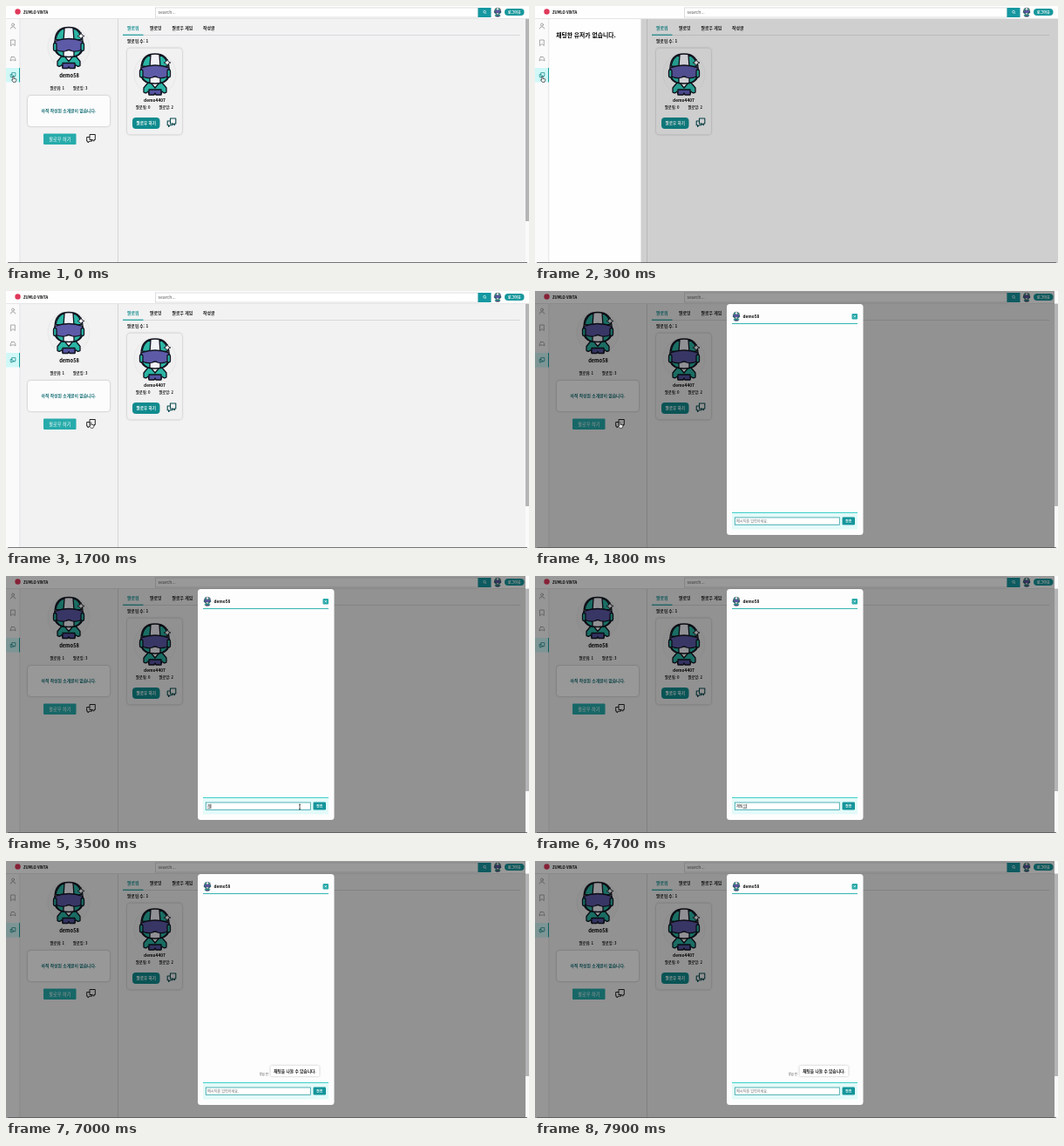
Write an HTML page that moves like this. It is 600 px wide and 295 px high and loops after 8 s.

```html
<!DOCTYPE html>
<html lang="ko">
<head>
<meta charset="utf-8">
<style>
  html, body { margin: 0; width: 100%; height: 100%; overflow: hidden; background: #f2f2f3; }
  svg { display: block; width: 100vw; height: 100vh; }
  text { font-family: "Noto Sans CJK KR", "Noto Sans CJK", "Noto Sans", sans-serif; fill: #151515; white-space: pre; }
  .b { font-weight: 700; }
  .k { font-weight: 900; fill: #000; }
  .m { text-anchor: middle; }
  .w { fill: #fff; }
  .line { fill: none; stroke: #888; stroke-width: .7; stroke-linejoin: round; stroke-linecap: round; }
  .soft { filter: drop-shadow(0 .6px 1px rgba(0,0,0,.28)); }
</style>
</head>
<body>
<svg viewBox="0 0 600 295" preserveAspectRatio="none">
  <defs>
    <g id="figure" stroke="#10131f" stroke-width="1.3" stroke-linejoin="round">
      <path d="M-8 10L-13 16V21Q-10 23-8 20L-7 23H7L8 20Q10 23 13 21V16L8 10Z" fill="#2bb5a5"/>
      <path d="M-5 10L0 16L5 10Z" fill="#fff"/>
      <path d="M-7 18H7V24H1L0 22L-1 24H-7Z" fill="#5553a0"/>
      <path d="M-16-6Q-16-23 0-23Q16-23 16-6V2Q14 11 0 11Q-14 11-16 2Z" fill="#f1f1f7"/>
      <path d="M-15-9Q-13-20-5-22L-6-8ZM5-22Q13-20 15-9L6-8ZM-15 2Q-13 9-6 10.500L-6 2ZM15 2Q13 9 6 10.500L6 2Z" fill="#2bb5a5"/>
      <path d="M-16-7Q0-13 16-7V2Q9 6 3 4Q0 2-3 4Q-9 6-16 2Z" fill="#5d5aa8"/>
      <rect x="-17.500" y="-5" width="3.500" height="9" rx="1.700" fill="#2bb5a5"/>
      <rect x="14" y="-5" width="3.500" height="9" rx="1.700" fill="#2bb5a5"/>
      <path d="M14-17L15.200-14.200L18-13L15.200-11.800L14-9L12.800-11.800L10-13L12.800-14.200Z" fill="#fff" stroke-width=".8"/>
    </g>
    <g id="avatar">
      <circle r="24" fill="#f0f0f1" stroke="#e2e2e3" stroke-width=".7"/>
      <use href="#figure"/>
    </g>
    <path id="chat" d="M-1.500-4.500H4.800V1.500H3.500V3.200L1.500 1.500H-1.500ZM-1.500-1.500H-4.800V3.200H-3.500V5L-1.500 3.200H1V1.500" fill="none" stroke-linejoin="round"/>
  </defs>

  <rect width="600" height="295" fill="#f2f2f3"/>

  <!-- profile panel -->
  <path d="M128.500 15V295" stroke="#d6d6d8"/>
  <use href="#avatar" x="72" y="47.500"/>
  <text class="k m" x="72.500" y="82" font-size="5.700">demo58</text>
  <text class="b" x="50.500" y="95.500" font-size="4.200">팔로워: 1</text>
  <text class="b" x="77" y="95.500" font-size="4.200">팔로잉: 3</text>
  <rect class="soft" x="25" y="103" width="94" height="35" rx="3.500" fill="#fcfcfd"/>
  <text class="b m" x="72" y="122.200" font-size="4.800" style="fill:#0d6b70">아직 작성된 소개글이 없습니다.</text>
  <rect x="43" y="146.500" width="37.500" height="12.500" rx="1" fill="#27abab"/>
  <text class="m w" x="61.800" y="154.700" font-size="5.200" font-weight="500">팔로우 하기</text>
  <use href="#chat" x="97.500" y="152" stroke="#222" stroke-width="1"/>

  <!-- tabs and follower card -->
  <path d="M134 33.500H590" stroke="#d4d4d6" stroke-width=".8"/>
  <path d="M134 33.200H157.500" stroke="#169c9c" stroke-width="1.200"/>
  <g class="b" font-size="4.900">
    <text x="139" y="26.700" style="fill:#128c8e">팔로워</text>
    <text x="165" y="26.700">팔로잉</text>
    <text x="190.500" y="26.700">팔로우 게임</text>
    <text x="226" y="26.700">작성글</text>
  </g>
  <text class="b" x="139" y="42" font-size="4.700">팔로워 수: 1</text>
  <rect class="soft" x="139" y="48.500" width="63" height="99" rx="4" fill="#f1f1f2"/>
  <use href="#avatar" x="171" y="78"/>
  <text class="k m" x="170.500" y="110.300" font-size="4.800">demo4407</text>
  <text class="b" x="149" y="117.700" font-size="4.200">팔로워: 0</text>
  <text class="b" x="175.500" y="117.700" font-size="4.200">팔로잉: 2</text>
  <rect x="145" y="128" width="31.500" height="13" rx="4" fill="#0f8b8e"/>
  <text class="b m w" x="160.800" y="136.200" font-size="4.600">팔로우 하기</text>
  <use href="#chat" x="190" y="133.500" stroke="#0b4a4e" stroke-width="1.100"/>

  <g id="scrollbar">
    <rect x="596" y="14" width="4" height="281" fill="#fafafa"/>
    <rect x="596" y="14" width="4" height="233" fill="#b4b4b6"/>
  </g>

  <!-- chat drawer -->
  <rect id="drawerShade" x="16" y="15" width="584" height="280" fill="#000" opacity="0"/>
  <g id="drawer">
    <rect x="16" y="15" width="125" height="280" fill="#fefefe"/>
    <text class="k m" x="78" y="36.300" font-size="6.800">채팅한 유저가 없습니다.</text>
  </g>

  <!-- sidebar -->
  <rect y="14" width="16" height="281" fill="#fafafb"/>
  <path d="M15.800 14V295" stroke="#dddde0" stroke-width=".7"/>
  <rect y="71" width="16" height="16.500" fill="#d0f8f7"/>
  <path d="M15.500 71V87.500" stroke="#1aa0a0"/>
  <g class="line">
    <circle cx="8" cy="21.500" r="1.500"/>
    <path d="M5.300 26Q5.500 23.800 8 23.800T10.700 26"/>
    <path d="M5.800 39H10.300V45.500L8 43.500L5.800 45.500Z"/>
    <path d="M6.500 58.500H9.500Q11 60 11 63L9.500 62H6.500L5 63Q5 60 6.500 58.500Z"/>
    <use href="#chat" transform="translate(8 79.300) scale(.6)" stroke="#148a8c" stroke-width="1.200"/>
  </g>

  <!-- header -->
  <rect width="600" height="14.500" fill="#fefefe"/>
  <path d="M0 14.500H600" stroke="#dedee0" stroke-width=".7"/>
  <circle cx="13.500" cy="6.500" r="3.200" fill="#e0395b"/>
  <text class="k" x="20" y="8.700" font-size="4.200">ZUMLO VINTA</text>
  <rect x="171.500" y="2" width="370" height="11" fill="#fff" stroke="#cfcfd2" stroke-width=".7"/>
  <text x="174.500" y="9.300" font-size="5.200" style="fill:#555">search...</text>
  <rect x="541.500" y="2" width="15" height="11" fill="#1598a1"/>
  <path d="M550 7.800L551 8.900" stroke="#fff" stroke-width=".6"/>
  <circle cx="549" cy="6.700" r="1.400" fill="none" stroke="#fff" stroke-width=".6"/>
  <use href="#figure" transform="translate(564 7) scale(.22)"/>
  <rect x="572" y="3" width="22.500" height="8" rx="4" fill="#16979c"/>
  <text class="b m w" x="583.300" y="8.600" font-size="4.100">로그아웃</text>

  <!-- chat window -->
  <g id="modal">
    <rect width="596" height="295" fill="#000" opacity=".4"/>
    <rect x="220" y="15" width="156.500" height="265" rx="3.500" fill="#fdfdfe"/>
    <use href="#figure" transform="translate(231 29) scale(.22)"/>
    <text class="k" x="238.500" y="31" font-size="4.700">demo58</text>
    <rect x="363.500" y="26" width="6.500" height="6.500" rx="1" fill="#2aa9a9"/>
    <path d="M365.700 28.200L367.800 30.300M367.800 28.200L365.700 30.300" stroke="#fff" stroke-width=".7"/>
    <path d="M226 37.500H370" stroke="#37b5b0"/>
    <rect x="226" y="254" width="144" height="19.500" fill="#e3faf9"/>
    <path d="M226 254.500H370" stroke="#3fd0cb"/>
    <rect x="229.300" y="260" width="120" height="8.300" fill="#fff" stroke="#2a9da0" stroke-width=".8"/>
    <text id="entry" x="231" y="265.700" font-size="4.100"></text>
    <path id="composing" stroke="#222" stroke-width=".5"/>
    <path id="caret" stroke="#111" stroke-width=".5"/>
    <rect x="352.500" y="259.500" width="14.500" height="9" rx="1.300" fill="#14959b"/>
    <text class="b m w" x="359.800" y="265.600" font-size="4">전송</text>
    <g id="message">
      <text x="290.800" y="245.900" font-size="3.300" style="fill:#333">방금 전</text>
      <rect class="soft" x="303.500" y="235" width="56" height="12" rx="1.500" fill="#fff"/>
      <text class="b m" x="331.500" y="242.500" font-size="4.700">채팅을 나눌 수 있습니다.</text>
    </g>
  </g>

  <path d="M2 294.500H598" stroke="#55555a" stroke-width=".8"/>

  <g id="pointer" stroke-linejoin="round">
    <path id="arrow" d="M0 0V4.800L1.200 3.800L2 5.500L2.800 5.100L2.100 3.500H3.600Z" fill="#000" stroke="#fff" stroke-width=".4"/>
    <path id="hand" d="M-.2 0Q.7-.6 1 .3V2.300L3.500 2.800Q4 3 3.700 4.500L3 6.300H.3L-1.500 3.800Q-1.300 3-.2 3.800Z" fill="#fff" stroke="#000" stroke-width=".6"/>
    <path id="beam" d="M-1-3Q0-3 0-2Q0-3 1-3M0-2V2M-1 3Q0 3 0 2Q0 3 1 3" fill="none" stroke="#111" stroke-width=".7"/>
  </g>
</svg>

<script>
const LOOP = 8000, STEP = 100;
const CLOSE = 1400, OPEN_CHAT = 1800, SEND = 6900;
const el = id => document.getElementById(id);
const clamp = v => Math.min(1, Math.max(0, v));
const ease = v => v * v * (3 - 2 * v);
const show = (id, on) => el(id).setAttribute('visibility', on ? 'inherit' : 'hidden');

// Pointer stops: time, x, y
const stops = [
  [0, 8, 81], [500, 8, 81], [1000, 266, 160], [1400, 266, 160],
  [1700, 97, 151], [1900, 97, 151], [2800, 337, 265], [LOOP, 337, 265]
];

// Each run: start time, committed text, composition states one step apart
const runs = [
  [3300, '', 'ㅊ 채'],
  [4300, '', '챝 채티 채팅 채팅ㅇ 채팅으 채팅을'],
  [5000, '채팅을 ', 'ㄴ 나 난 나누 나눌'],
  [5500, '채팅을 나눌 ', 'ㅅ 수'],
  [5700, '채팅을 나눌 수 ', 'ㅇ 이 있 있ㅅ 있스 있습 있습니 있습닏 있습니다 있습니다.']
];

function pointerAt(t) {
  const i = stops.findIndex((s, n) => n && t <= s[0]);
  const [t0, x0, y0] = stops[i - 1], [t1, x1, y1] = stops[i];
  const p = ease((t - t0) / (t1 - t0));
  return [x0 + (x1 - x0) * p, y0 + (y1 - y0) * p];
}

function typedAt(t) {
  const run = runs.filter(r => r[0] <= t).pop();
  if (!run || t >= SEND) return '';
  const states = run[2].split(' ');
  return run[1] + states[Math.min(states.length - 1, Math.floor((t - run[0]) / STEP))];
}

function drawEntry(t) {
  const typed = typedAt(t), entry = el('entry');
  entry.textContent = typed || '메시지를 입력하세요.';
  entry.style.fill = typed ? '#151515' : '#6b6b70';
  show('caret', typed);
  show('composing', typed && !typed.endsWith('.'));
  if (!typed) return;
  const end = 231 + entry.getComputedTextLength();
  const start = 231 + (typed.length > 1 ? entry.getSubStringLength(0, typed.length - 1) : 0);
  el('caret').setAttribute('d', `M${end + .3} 261.700V266.700`);
  el('composing').setAttribute('d', `M${start} 266.700H${end}`);
}

function draw(t) {
  const open = ease(clamp(t / 400)) * (1 - ease(clamp((t - CLOSE) / 200)));
  el('drawer').setAttribute('transform', `translate(${-125 * (1 - open)} 0)`);
  el('drawerShade').setAttribute('opacity', .17 * open);
  show('scrollbar', open === 0);

  show('modal', t >= OPEN_CHAT);
  show('message', t >= SEND);
  drawEntry(t);

  const [x, y] = pointerAt(t);
  el('pointer').setAttribute('transform', `translate(${x} ${y})`);
  const hand = t <= 500 || (t >= 1700 && t <= 1900);
  const beam = t >= 2700;
  show('pointer', t < 4000);
  show('hand', hand);
  show('beam', beam);
  show('arrow', !hand && !beam);
  // Hidden parts must stay hidden inside a hidden pointer
  el('pointer').style.display = t < 4000 ? '' : 'none';
}

const began = performance.now();
function tick() {
  const t = (performance.now() - began) % LOOP;
  draw(Math.floor(t / STEP) * STEP);
  requestAnimationFrame(tick);
}
tick();
</script>
</body>
</html>
```
